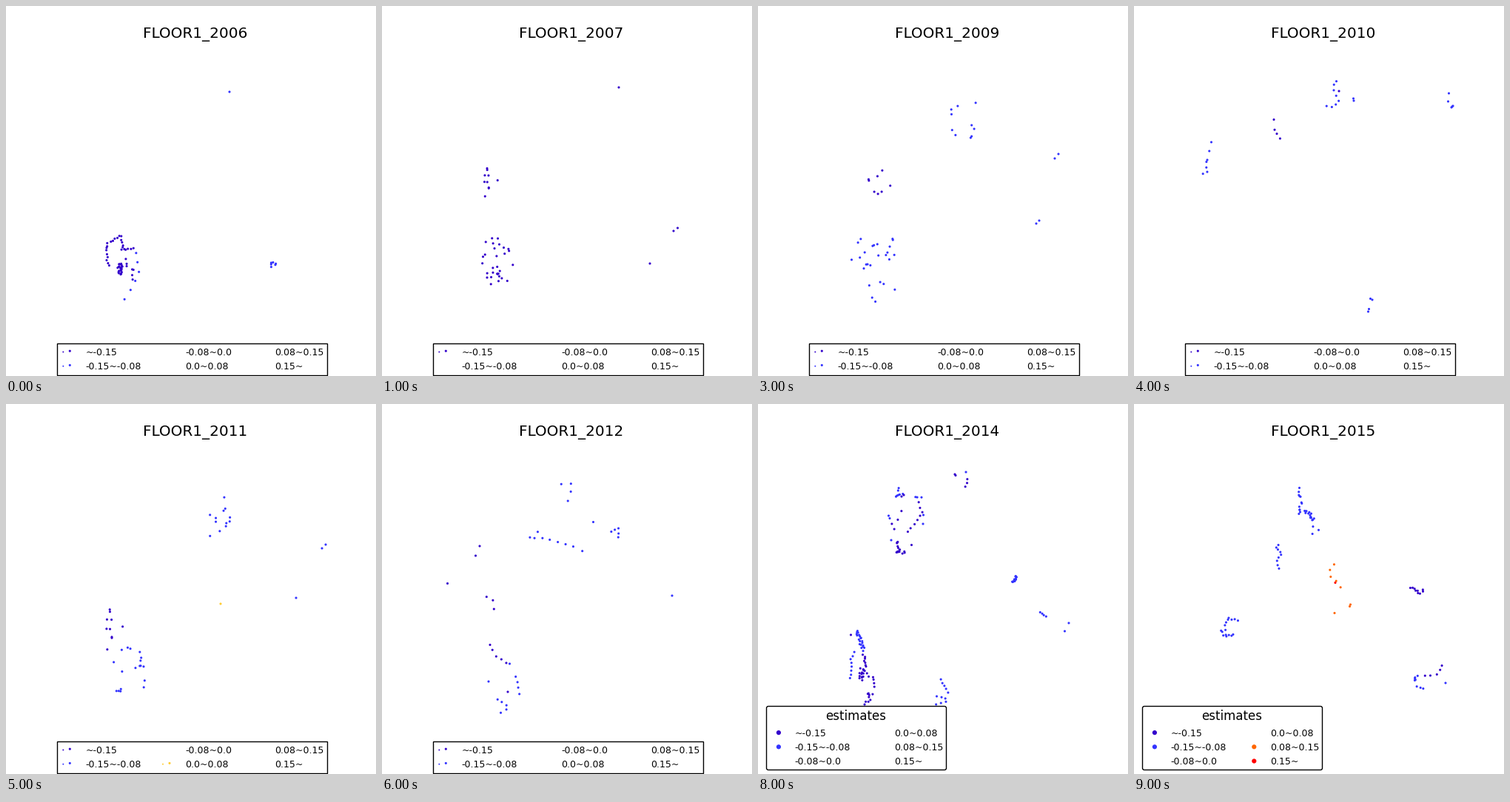
Write a matplotlib script that moves like this. It is 500x500 px and loops after 10000 ms.

```python
import numpy as np
import matplotlib.pyplot as plt
from matplotlib.animation import FuncAnimation
from matplotlib.patches import FancyBboxPatch, Rectangle

plt.rcParams["font.family"] = "DejaVu Sans"

SIZE, DPI = 500, 100
FIRST_YEAR = 2006
COLOURS = ["#3300cc", "#3333ff", "#4db8ff", "#ffcc33", "#ff6600", "#ff0000"]
LABELS = ["~-0.15", "-0.15~-0.08", "-0.08~0.0",
          "0.0~0.08", "0.08~0.15", "0.15~"]
DARK, BLUE, SKY, YELLOW, ORANGE, RED = range(6)

fig = plt.figure(figsize=(SIZE / DPI, SIZE / DPI), dpi=DPI, facecolor="white")
ax = fig.add_axes([0, 0, 1, 1])
shown = set()


def marks(xs, ys, colour, s=5, z=2):
    ax.scatter(xs, ys, s=s, c=colour, edgecolors="none", zorder=z)


def blob(kind, cx, cy, rx, ry, n):
    """Scatter n points inside an ellipse."""
    rng = np.random.default_rng(n + int(cx))
    a = rng.uniform(0, 2 * np.pi, n)
    r = np.sqrt(rng.uniform(0, 1, n))
    shown.add(kind)
    marks(cx + rx * r * np.cos(a), cy + ry * r * np.sin(a), COLOURS[kind])


def trail(kind, n, spread, *path):
    """Space n points evenly along a polyline x, y, x, y, ... with jitter."""
    xs, ys = np.array(path[::2], float), np.array(path[1::2], float)
    along = np.r_[0, np.cumsum(np.hypot(np.diff(xs), np.diff(ys)))]
    at = np.linspace(0, along[-1], n)
    dx, dy = np.random.default_rng(n + int(xs[0])).uniform(-spread, spread,
                                                           (2, n))
    shown.add(kind)
    marks(np.interp(at, along, xs) + dx, np.interp(at, along, ys) + dy,
          COLOURS[kind])


def dot(kind, x, y):
    trail(kind, 1, 0, x, y)


def pair(kind, x0, y0, x1, y1):
    trail(kind, 2, 0, x0, y0, x1, y1)


def year_2006():
    trail(DARK, 16, 1.5, 157, 316, 155, 310, 136, 322, 134, 330, 139, 350)
    trail(DARK, 9, 1.5, 158, 320, 157, 330, 171, 328)
    blob(DARK, 154, 355, 4, 8, 22)
    trail(DARK, 7, 2, 162, 341, 162, 353, 174, 355, 170, 370)
    trail(BLUE, 6, 1.5, 175, 333, 180, 361, 175, 371, 160, 395)
    blob(BLUE, 361, 350, 4, 4, 6)
    dot(BLUE, 302, 116)


def year_2007():
    blob(DARK, 155, 345, 24, 34, 30)
    blob(DARK, 150, 235, 18, 28, 10)
    pair(DARK, 399.5, 300, 394, 304)
    pair(DARK, 362, 348, 320, 110)


def year_2008():
    pair(BLUE, 346.5, 75, 333, 85)
    blob(BLUE, 137, 201, 9, 7, 9)
    pair(DARK, 139, 210, 137, 213)
    trail(BLUE, 3, 1.5, 173, 202, 174, 217)
    trail(DARK, 11, 1.5, 151, 241, 163, 249, 175, 248)
    pair(DARK, 172, 237, 180, 258)
    dot(BLUE, 137, 268.5)
    pair(BLUE, 168, 292, 174, 296)
    trail(BLUE, 4, 1, 245, 310, 257, 315)
    pair(BLUE, 352.5, 261.5, 355.5, 264)
    pair(BLUE, 372, 295.5, 376.5, 296)
    pair(BLUE, 393, 306, 388.5, 309.5)
    # large lower group
    trail(BLUE, 14, 2.5, 178, 346, 165, 355, 152, 369)
    trail(BLUE, 7, 2, 184, 352, 200, 357, 207, 370, 215, 369)
    trail(BLUE, 10, 2.5, 135, 376, 141, 388, 153, 396)
    blob(BLUE, 174, 379, 13, 13, 9)
    trail(BLUE, 13, 1.5, 176, 396, 180, 407, 200, 404)
    trail(BLUE, 4, 1, 207, 390, 218, 396)
    trail(DARK, 4, 1, 166, 403, 159, 418)
    trail(BLUE, 3, 1, 110.5, 430.5, 119.5, 417.5)
    pair(DARK, 121, 421, 117, 429)


def year_2009():
    blob(DARK, 165, 235, 16, 20, 8)
    blob(BLUE, 160, 350, 34, 50, 26)
    blob(BLUE, 280, 150, 24, 30, 10)
    pair(BLUE, 406, 200, 401, 206)
    pair(BLUE, 380, 290, 376, 294)


def year_2010():
    dot(DARK, 189, 153.5)
    trail(DARK, 3, 1, 190, 168, 197, 179)
    trail(BLUE, 8, 1.5, 272, 101, 268, 112, 276, 128, 271, 137, 261, 134)
    dot(DARK, 277, 115)
    pair(BLUE, 296.5, 125, 297, 128)
    pair(BLUE, 425.5, 118, 424.5, 129)
    trail(BLUE, 3, 0, 429, 137, 431, 135)
    trail(BLUE, 3, 0, 104.5, 184, 99, 208)
    trail(BLUE, 4, 1, 97, 211, 99, 223, 93, 227)
    pair(BLUE, 319.5, 395.5, 322, 397)
    pair(BLUE, 317.5, 409.5, 316.5, 413)


def year_2011():
    blob(DARK, 150, 300, 22, 40, 10)
    blob(BLUE, 165, 365, 26, 40, 18)
    blob(BLUE, 285, 150, 30, 30, 12)
    pair(BLUE, 432, 190, 427, 195)
    dot(BLUE, 392, 262)
    dot(YELLOW, 290, 270)


def year_2012():
    trail(BLUE, 4, 0.5, 242.5, 108, 258, 108, 251, 130.5)
    dot(BLUE, 285.5, 159.5)
    trail(BLUE, 5, 1, 309, 173, 319, 168, 320, 180)
    trail(BLUE, 9, 1.5, 209, 173, 197, 181, 227, 182, 258, 193, 270, 198)
    pair(DARK, 132, 192, 126.5, 205)
    dot(DARK, 88.5, 242.5)
    trail(DARK, 3, 0.5, 141, 261, 150, 262.5, 151.5, 277.5)
    trail(DARK, 5, 1, 146, 325.5, 152, 339, 168, 350)
    dot(DARK, 170, 389)
    pair(BLUE, 172.5, 351, 144, 375)
    trail(BLUE, 4, 1.5, 181.5, 369, 186, 392.5)
    trail(BLUE, 5, 1.5, 157.5, 399, 170, 410, 162, 417)
    dot(BLUE, 392, 259)


def year_2013():
    # upper right wing
    trail(BLUE, 12, 2, 327, 100, 324, 110, 335, 111, 329, 120, 339, 126)
    trail(BLUE, 6, 1.5, 352, 124, 358, 118, 367, 132, 370, 142)
    trail(DARK, 8, 1.5, 352, 133, 362, 139, 356, 144, 359, 155)
    blob(DARK, 338, 156, 11, 10, 20)
    trail(DARK, 9, 2, 350, 173, 355, 167, 357, 173)
    blob(DARK, 332, 187, 13, 13, 30)
    dot(DARK, 310, 193)
    trail(DARK, 6, 1.5, 372, 179, 375, 184, 366, 190)
    trail(BLUE, 8, 1, 384, 189, 380, 201, 370, 203, 371, 193)
    pair(BLUE, 282, 156, 284, 158)
    pair(BLUE, 279.5, 176.5, 281, 180)
    trail(BLUE, 4, 0.5, 324, 205, 330, 204)
    pair(BLUE, 320, 219.5, 325, 221)
    pair(BLUE, 313, 232, 297, 246)
    trail(BLUE, 12, 1.5, 363, 229, 347, 223, 341, 234)
    trail(BLUE, 4, 2, 352, 238, 334, 246)
    trail(BLUE, 18, 1, 318, 271, 329, 250)
    trail(BLUE, 4, 1, 299, 287, 304, 286, 303, 299)
    dot(SKY, 292, 301.5)
    # lower left wing
    pair(BLUE, 115, 325, 118, 321)
    trail(BLUE, 9, 1.5, 145, 309, 134, 311, 138, 320, 138, 334)
    blob(BLUE, 158, 324, 8, 13, 26)
    trail(BLUE, 3, 1.5, 170, 311, 176, 315)
    pair(BLUE, 183.5, 294, 185.5, 297)
    blob(BLUE, 187, 313, 5, 7, 12)
    trail(BLUE, 8, 1.5, 202, 305, 209, 314, 204, 322, 211, 335, 210, 349)
    dot(DARK, 202.5, 352)
    trail(BLUE, 9, 3, 180, 333, 185, 340, 177, 344, 187, 359)
    trail(BLUE, 12, 2, 170, 358, 161, 365, 161, 382, 152, 399, 155, 411)
    trail(BLUE, 6, 1.5, 178, 370, 181, 386, 181, 401)
    trail(BLUE, 5, 1.5, 203, 366, 193, 368, 196, 376)
    trail(BLUE, 6, 1.5, 208, 386, 207, 397, 197, 400)
    trail(BLUE, 6, 0.5, 167, 405, 168, 429)
    blob(BLUE, 190, 422, 7, 9, 13)


def year_2014():
    dot(BLUE, 281, 92)
    pair(DARK, 266, 95, 267, 96.5)
    trail(DARK, 3, 1, 283, 102, 281, 111)
    trail(BLUE, 7, 1.5, 189, 114, 190, 121, 185, 124, 197, 121)
    pair(DARK, 194, 125, 197, 123)
    trail(BLUE, 3, 1, 212, 125, 220, 127)
    trail(DARK, 8, 1, 217, 133, 222, 149, 202, 173)
    pair(BLUE, 223.5, 150, 223, 162)
    pair(BLUE, 176.5, 151, 178, 154.5)
    trail(DARK, 4, 1, 193, 145, 186, 161, 179, 161, 184, 170)
    dot(BLUE, 180, 184)
    trail(DARK, 15, 1.5, 188, 185, 191, 198, 186, 200, 199, 201)
    dot(DARK, 207.5, 190.5)
    blob(BLUE, 347, 238, 4, 7, 12)
    trail(BLUE, 4, 0.5, 381.5, 281, 389, 287)
    pair(BLUE, 420, 296, 414.5, 307)
    # lower groups
    trail(BLUE, 20, 2.5, 134, 306, 137, 316, 142, 332)
    trail(BLUE, 8, 1, 130, 336, 125, 345, 126, 358, 125, 371)
    dot(DARK, 125.5, 312)
    trail(DARK, 7, 1.5, 143, 340, 145, 354)
    blob(DARK, 140, 365, 3.5, 10, 14)
    trail(DARK, 7, 1.5, 145, 361, 151, 368, 156, 368, 156, 381)
    trail(DARK, 9, 1.5, 154, 391, 148, 390, 152, 400, 144, 405)
    trail(BLUE, 5, 1, 247, 372, 252, 383, 257, 390)
    trail(BLUE, 6, 1, 241, 395, 250, 396, 256, 402, 241, 406)


def year_2015():
    trail(BLUE, 12, 2.5, 222, 115, 225, 125, 225, 138, 221, 150)
    trail(BLUE, 14, 2, 231, 144, 238, 149, 243, 158)
    trail(BLUE, 3, 0.5, 242, 166, 250, 170, 241.5, 175.5)
    trail(BLUE, 9, 1, 195, 190, 191, 195, 201, 203, 194, 210, 195, 223)
    trail(BLUE, 8, 1.5, 139, 293, 127, 290, 123, 304)
    trail(BLUE, 8, 1.5, 119, 307, 122, 313, 133, 312)
    trail(ORANGE, 5, 1, 269.5, 216.5, 263, 230, 279, 247)
    pair(ORANGE, 292.5, 271, 291.5, 273.5)
    dot(ORANGE, 271, 282.5)
    dot(RED, 272, 241.5)
    trail(DARK, 9, 1.5, 372.5, 248, 379, 250, 385, 256, 391.5, 252)
    trail(DARK, 5, 1, 415.5, 353, 411, 365, 393, 368)
    blob(BLUE, 382, 370, 4, 5, 5)
    trail(BLUE, 3, 1, 382.5, 381, 391.5, 384)
    dot(BLUE, 421, 377)


YEARS = [year_2006, year_2007, year_2008, year_2009, year_2010,
         year_2011, year_2012, year_2013, year_2014, year_2015]


def label(x, y, text, size=9, ha="left"):
    ax.text(x, y, text, fontsize=size, ha=ha, va="baseline", zorder=5)


def wide_legend():
    ax.add_patch(Rectangle((69, 456), 365, 43, fc="white", ec="black",
                           lw=1, zorder=3))
    for kind, text in enumerate(LABELS):
        x = (107.3, 242, 363)[kind // 2]
        y = 472 + 19.2 * (kind % 2)
        label(x, y, text)
        if kind in shown:
            marks([x - 30], [y - 4.5], COLOURS[kind], 2, 4)
            marks([x - 21], [y - 5.8], COLOURS[kind], 5, 4)


def titled_legend():
    ax.add_patch(FancyBboxPatch((11.5, 408.5), 243, 86, fc="white",
                                ec="black", lw=1, zorder=3,
                                boxstyle="round,pad=0,rounding_size=2.5"))
    label(132.5, 427, "estimates", 12, "center")
    for kind, text in enumerate(LABELS):
        x = (49.8, 184.2)[kind // 3]
        y = 448.8 + 19.2 * (kind % 3)
        label(x, y, text)
        if kind in shown:
            marks([x - 21.9], [y - 4.7], COLOURS[kind], 20, 4)


def draw(i):
    ax.clear()
    ax.set_xlim(0, SIZE)
    ax.set_ylim(SIZE, 0)
    ax.axis("off")
    shown.clear()
    YEARS[i]()
    year = FIRST_YEAR + i
    label(255.25, 43, f"FLOOR1_{year}", 14.4, "center")
    if year < 2014:
        wide_legend()
    else:
        titled_legend()
    return []


anim = FuncAnimation(fig, draw, frames=len(YEARS), interval=1000,
                     init_func=lambda: draw(0), repeat=True, repeat_delay=0)
plt.show()
```
